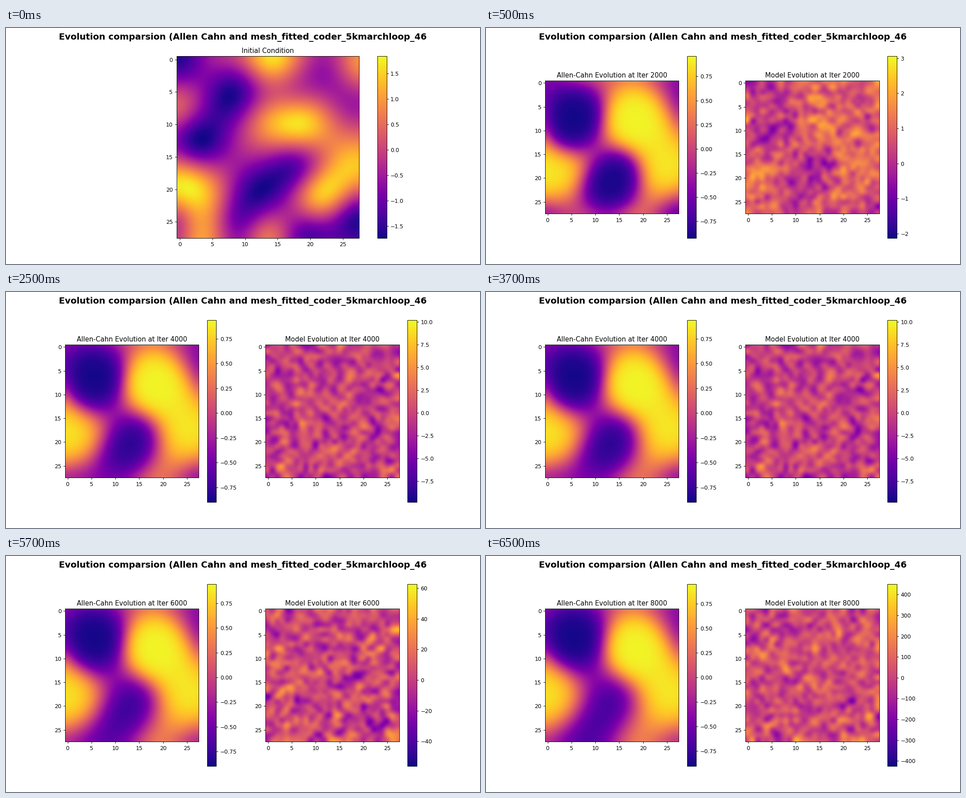
A matplotlib script that plays this animation: 1058x529 px, repeating every 8 s.

```python
import numpy as np
import matplotlib.pyplot as plt
from matplotlib.animation import FuncAnimation

N = 28
STEP_MS = 500
SLOTS = 16
TITLE = "Evolution comparsion (Allen Cahn and mesh_fitted_coder_5kmarchloop_46"

# Peaks and hollows of the starting field: x, y, level in percent
START = [
    (0, 0, 3), (4, 1, 28), (7.2, 6, 0), (10, 3.5, 22), (2.5, 12.5, 0),
    (9, 12, 38), (12.2, 20.5, 0), (18.2, 16.7, 18), (8.8, 26, 25),
    (19, 27, 14), (27, 24.5, 4), (27, 6, 35), (24, 1, 42), (17, 4.8, 50),
    (14, 0, 96), (27, 1, 72), (13.5, 9.5, 78), (18.8, 10, 96), (0, 8, 55),
    (0, 19, 97), (3.5, 21.5, 90), (3, 27, 78), (0, 25.5, 45), (13.2, 27, 64),
    (21.5, 20.7, 90), (27, 16, 89),
]

# Key points of the two phases: x, y, early strength, late strength
PHASE = [
    (0, 0, -0.55, -0.55), (5, 0, -0.4, -1), (11, 1, -0.1, -0.5),
    (17, 0, 0.5, 0.4), (26.5, 1, -0.4, -0.4), (0, 8, -0.6, -0.5),
    (5, 6, -2.2, -2.2), (18, 9, 2.2, 2.2), (27, 7, 0, 0),
    (4.5, 11, -1.5, -0.75), (9, 15.5, -0.2, -0.4), (17, 14, 0.4, 0.6),
    (0, 19.5, 1.5, 1.25), (13, 21, -2, -0.95), (20, 20, 0.2, 0.45),
    (25, 18, 1.5, 1.5), (0, 27, -0.25, -0.15), (9, 27, -0.25, -0.9),
    (18, 27, 0.1, 0.3), (25.5, 27, -0.45, 0),
]

START_RANGE = (-1.738, 1.84)
PHASE_RANGES = [(-0.9245, 0.958), (-0.898, 0.937), (-0.898, 0.942), (-0.906, 0.948)]
MODEL_RANGES = [(-2.13, 3.057), (-9.79, 10.17), (-56.2, 62.5), (-424.7, 449.3)]

GY, GX = np.mgrid[0:N, 0:N]


def surface(x, y, height, reach):
    """Smooth Gaussian-process surface through scattered heights."""
    def kernel(dx, dy):
        return np.exp(-(dx ** 2 + dy ** 2) / (2 * reach ** 2))

    gram = kernel(x[:, None] - x, y[:, None] - y) + 0.005 * np.eye(len(x))
    basis = kernel(GX[..., None] - x, GY[..., None] - y)
    return basis @ np.linalg.solve(gram, height)


def start_field():
    x, y, level = np.array(START, float).T
    return np.clip(0.5 + surface(x, y, level / 100 - 0.5, 3.3), 0, 1)


def phase_field(stage):
    """Saturating two-phase field that relaxes from early to late."""
    x, y, early, late = np.array(PHASE, float).T
    blend = (1 - 0.5 ** stage) / (1 - 0.5 ** 3)
    strength = surface(x, y, early + blend * (late - early), 5.5)
    return 0.5 + 0.5 * np.tanh(strength)


def model_field(stage, start):
    """Noise over the full range; only the first stage still recalls the start."""
    field = np.random.default_rng(40 + stage).standard_normal((N, N))
    if stage == 0:
        field += 1.9 * (start - 0.5)
    return (field - field.min()) / np.ptp(field)


def panel(pos, field, limits, title):
    lo, hi = limits
    ax = fig.add_subplot(*pos)
    im = ax.imshow(lo + field * (hi - lo), cmap="plasma", vmin=lo, vmax=hi,
                   interpolation="bicubic")
    ax.set_title(title)
    fig.colorbar(im, ax=ax)


start = start_field()
phases = [phase_field(s) for s in range(4)]
models = [model_field(s, start) for s in range(4)]

plt.rcParams["font.family"] = "DejaVu Sans"
fig = plt.figure(figsize=(12, 6), dpi=529 / 6)


def draw(slot):
    fig.clear()
    fig.suptitle(TITLE, fontsize=16, fontweight="bold")
    stage = (slot + 3) // 4 - 1
    if stage < 0:
        panel((1, 1, 1), start, START_RANGE, "Initial Condition")
        return
    count = 2000 * (stage + 1)
    panel((1, 2, 1), phases[stage], PHASE_RANGES[stage],
          f"Allen-Cahn Evolution at Iter {count}")
    panel((1, 2, 2), models[stage], MODEL_RANGES[stage],
          f"Model Evolution at Iter {count}")


anim = FuncAnimation(fig, draw, frames=SLOTS, init_func=lambda: None,
                     interval=STEP_MS, repeat=True, repeat_delay=0)
plt.show()
```
